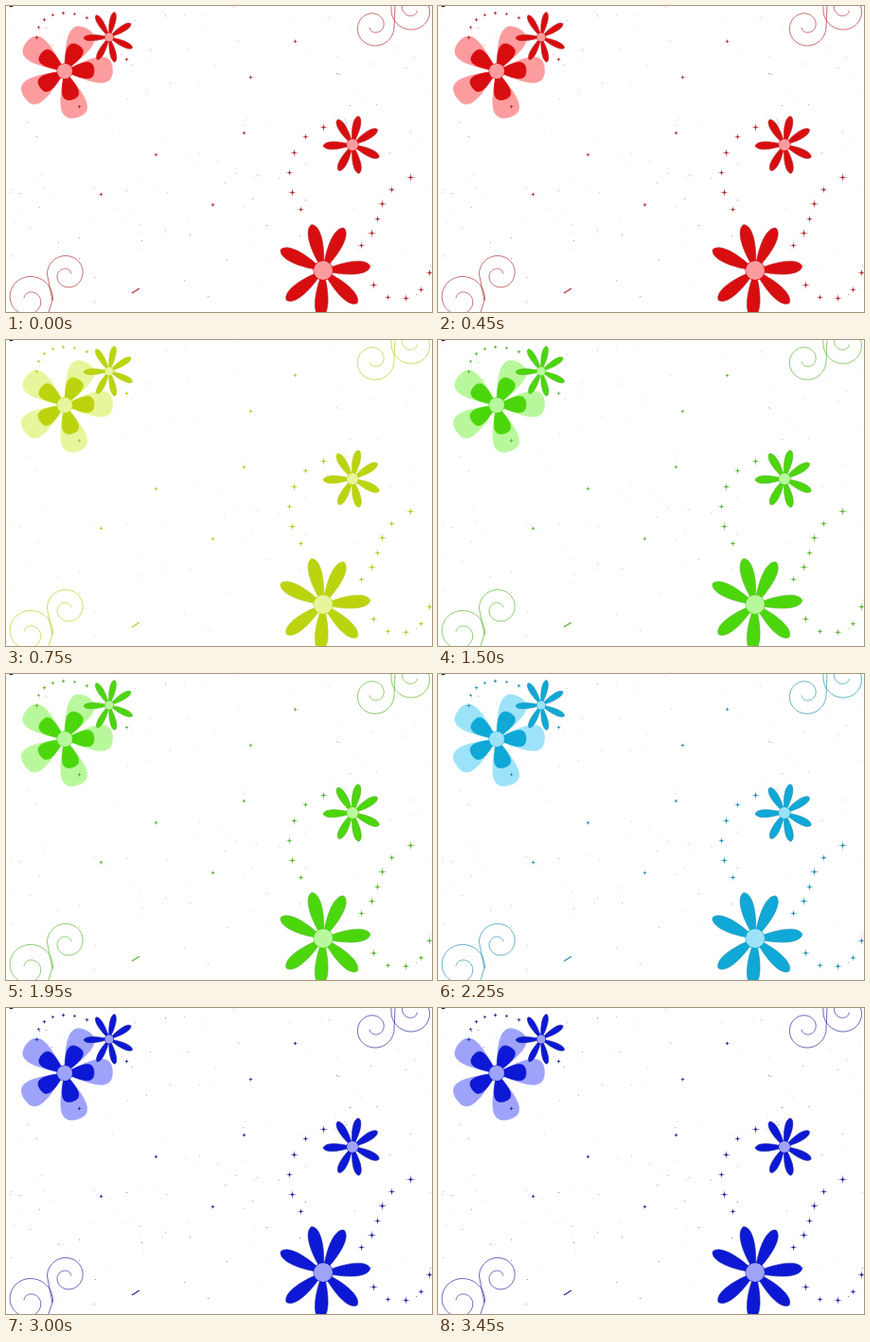
Animation of 450x324 px, one loop 3750 ms. Source, as an HTML page with a canvas:

```html
<!DOCTYPE html>
<html lang="en">
<head>
<meta charset="utf-8">
<title>Flowers</title>
<style>
html, body { margin: 0; width: 100%; height: 100%; overflow: hidden; background: #fff; }
canvas { display: block; width: 450px; height: 324px; }
</style>
</head>
<body>
<canvas id="stage" width="450" height="324"></canvas>
<script>
const ctx = document.getElementById('stage').getContext('2d');
const STEP = 750;
const TAU = Math.PI * 2;

const palettes = [
  { main: '#d80d10', light: '#fd9c9e', line: '#b02c30' },
  { main: '#bcd40e', light: '#e6f69c', line: '#b4cc20' },
  { main: '#4cd60c', light: '#b9f79c', line: '#55b52c' },
  { main: '#10a8d6', light: '#9ce3f9', line: '#2090b4' },
  { main: '#0c18d4', light: '#9ea3f9', line: '#2028a0' }
];

// Petal directions in degrees.
const blossom = [-63, -2, 75, 147, 217];
const daisySmall = [-78, -32, 25, 77, 118, 178, 239];
const daisyLarge = [-104, -64, -5, 44, 93, 141, 206];

function disc(x, y, r, color) {
  ctx.fillStyle = color;
  ctx.beginPath();
  ctx.arc(x, y, r, 0, TAU);
  ctx.fill();
}

// The two control points, in units of length and width, set the petal's outline.
function petals(x, y, angles, len, width, [ax, ay, bx, by], fill, edge) {
  ctx.fillStyle = fill;
  ctx.strokeStyle = edge;
  ctx.lineWidth = .6;
  for (const deg of angles) {
    ctx.save();
    ctx.translate(x, y);
    ctx.rotate(deg * TAU / 360);
    ctx.beginPath();
    ctx.moveTo(0, 0);
    ctx.bezierCurveTo(len * ax, -width * ay, len * bx, -width * by, len, 0);
    ctx.bezierCurveTo(len * bx, width * by, len * ax, width * ay, 0, 0);
    ctx.fill();
    ctx.stroke();
    ctx.restore();
  }
}

function daisy(x, y, angles, len, width, r, p) {
  petals(x, y, angles, len, width, [.4, .55, .93, .78], p.main, p.line);
  disc(x, y, r, p.main);
  disc(x, y, r - .5, p.light);
}

function blossomFlower(x, y, p) {
  const round = [.42, .36, 1, .93];
  petals(x, y, blossom, 50.5, 27, round, p.light, p.light);
  petals(x, y, blossom, 31, 17, round, p.main, p.main);
  disc(x, y, 8.5, p.main);
  disc(x, y, 8, p.light);
}

function star(x, y, arm, color) {
  ctx.fillStyle = color;
  ctx.beginPath();
  for (let i = 0; i < 8; i++) {
    const r = i % 2 ? .75 : arm;
    ctx.lineTo(x + .5 + r * Math.cos(i * TAU / 8), y + .5 + r * Math.sin(i * TAU / 8));
  }
  ctx.fill();
  ctx.globalAlpha = .6;
  disc(x + .5, y + .5, arm * .32, color);
  ctx.globalAlpha = 1;
}

// Stars spread evenly along a cubic curve, large and small in turn.
function trail(count, arm, xs, ys, color) {
  const at = ([a, b, c, d], t, u = 1 - t) =>
    u * u * u * a + 3 * u * u * t * b + 3 * u * t * t * c + t * t * t * d;
  for (let i = 0; i < count; i++) {
    const t = i / (count - 1);
    star(Math.round(at(xs, t)), Math.round(at(ys, t)), arm * (i % 2 ? .8 : 1), color);
  }
}

// A stem leads into a round loop that then winds quickly inwards.
function curl(stemX, stemY, x, y, radius, start, dir) {
  ctx.beginPath();
  ctx.moveTo(stemX, stemY);
  for (let t = 0; t <= 1; t += .01) {
    const a = start + dir * t * 1.5 * TAU;
    const u = Math.min(1, Math.max(0, (t - .2) / .65));
    const r = radius * (1 - .7 * u * u * (3 - 2 * u));
    ctx.lineTo(x + r * Math.cos(a), y + r * Math.sin(a));
  }
  ctx.stroke();
}

function specks(color) {
  let seed = 17;
  const random = () => (seed = seed * 16807 % 2147483647) / 2147483647;
  ctx.fillStyle = color;
  for (let i = 0; i < 150; i++) {
    ctx.globalAlpha = .1 + .5 * random() ** 2;
    ctx.fillRect(Math.floor(random() * 450), Math.floor(random() * 324), 1, 1);
  }
  ctx.globalAlpha = 1;
}

function curls(color) {
  ctx.strokeStyle = color;
  ctx.lineWidth = .7;
  curl(411, 0, 390, 22, 20, 0, 1);
  curl(407, 0, 428, 4, 21, Math.PI, -1);
  curl(45, 324, 26, 310, 23.5, 0, -1);
  curl(49, 312, 63, 284, 19.5, Math.PI, 1);
}

function penMarks(p) {
  ctx.strokeStyle = p.line;
  ctx.lineWidth = 1.2;
  ctx.beginPath();
  ctx.moveTo(133, 304);
  ctx.lineTo(141, 299);
  ctx.stroke();
  ctx.strokeStyle = '#222';
  ctx.beginPath();
  ctx.arc(5.5, -1.5, 2.2, 0, Math.PI);
  ctx.stroke();
}

function draw(p) {
  ctx.fillStyle = '#fff';
  ctx.fillRect(0, 0, 450, 324);
  specks(p.line);
  curls(p.line);

  blossomFlower(62, 69, p);
  daisy(109, 33, daisySmall, 27, 6.2, 5, p);
  daisy(366, 147, daisySmall, 31, 8, 6.5, p);
  daisy(335, 280, daisyLarge, 50, 13.5, 10.5, p);

  trail(6, 4.5, [335, 297, 290, 311], [128, 136, 190, 215], p.line);
  trail(6, 5, [427, 382, 402, 375], [181, 199, 235, 253], p.line);
  trail(5, 4.5, [388, 403, 443, 447], [295, 321, 311, 282], p.line);
  trail(7, 2.5, [32, 32, 60, 85], [33, 8, 2, 12], p.line);

  for (const [x, y] of [[305, 37], [258, 75], [251, 134], [158, 157], [100, 199], [218, 210], [127, 56], [77, 106]])
    star(x, y, 2.4, p.line);

  penMarks(p);
}

function tick() {
  draw(palettes[Math.floor(performance.now() / STEP) % palettes.length]);
  requestAnimationFrame(tick);
}
tick();
</script>
</body>
</html>
```
